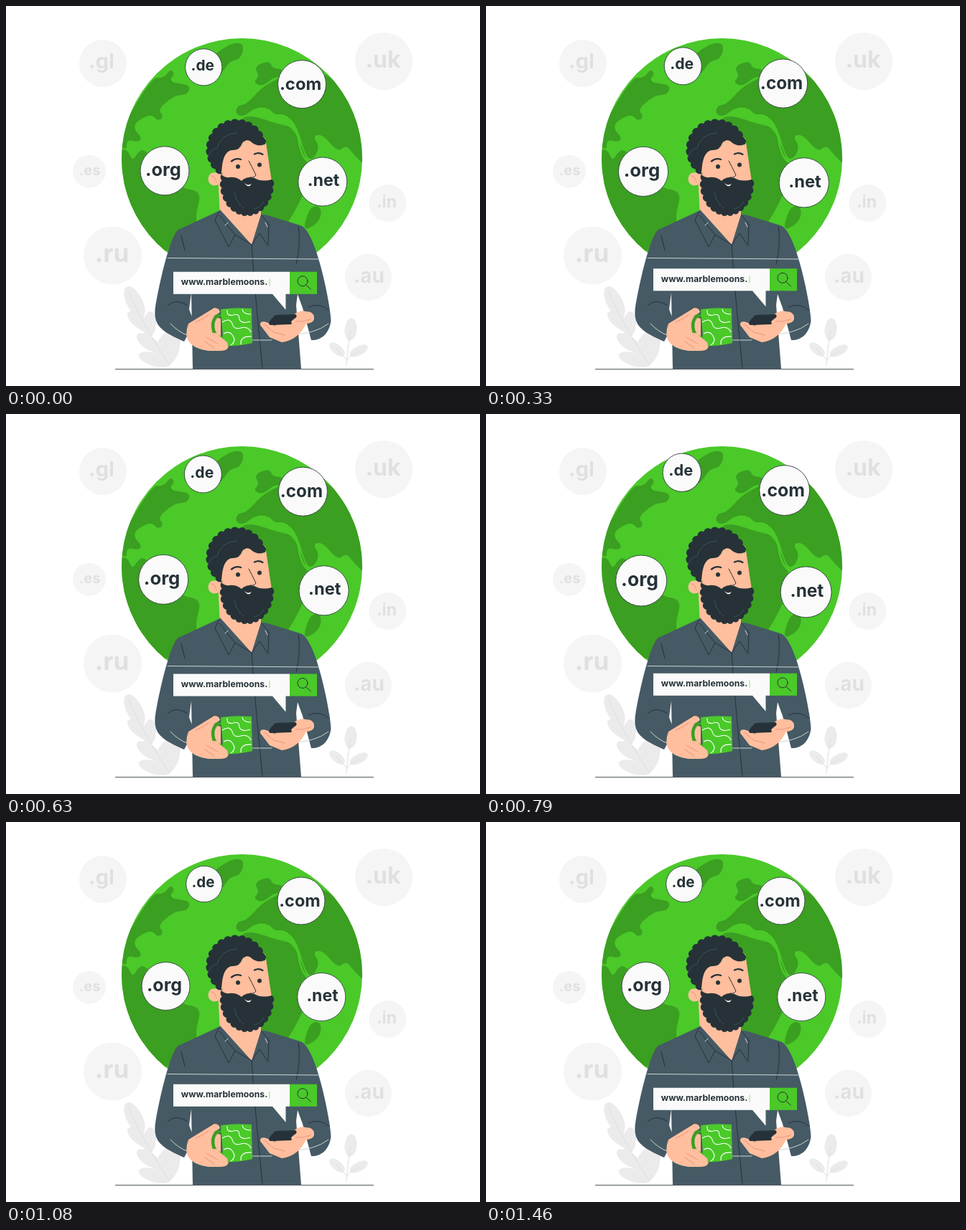
An HTML page for the animation above (1.5 s loop, 660 by 530 pixels).

```html
<!DOCTYPE html>
<html lang="en">
<head>
<meta charset="utf-8">
<title>Domain names</title>
<style>
  html, body { margin: 0; width: 100%; height: 100%; overflow: hidden; background: #fff; }
  svg { display: block; width: 100vw; height: 100vh; }
  text { font-family: Inter, "Open Sans", sans-serif; font-weight: 700; text-anchor: middle; }
  .line { fill: none; stroke: #263238; stroke-linecap: round; stroke-linejoin: round; }
  .brow { stroke-width: 2.3; }
  .pale { fill: none; stroke: #cfd4d2; stroke-linecap: round; }
  .crease { fill: none; stroke: #dd8f72; stroke-width: .8; stroke-linecap: round; }
  .skin { fill: #ffbe9d; }
  .dark { fill: #263238; }
  .shirt { fill: #455a64; }
  .land { fill: #3b9f21; }
  .green { fill: #4ac929; }
</style>
</head>
<body>
<svg viewBox="0 0 660 530">
  <defs><clipPath id="disc"><circle cx="328.5" cy="212.5" r="167.5"/></clipPath></defs>

  <g id="faded"></g>
  <g id="plants" fill="#ebebeb"></g>

  <circle class="green" cx="328.5" cy="212.5" r="167.5"/>
  <g id="lands" class="land" clip-path="url(#disc)"></g>
  <path d="M391 164Q404 168 407 184Q412 220 429 220" fill="none" stroke="#4ac929" stroke-width="2.5"/>

  <path d="M152 506.5H512" stroke="#263238" stroke-width=".8"/>

  <!-- body -->
  <path class="shirt" d="M296 286L240 312C228 319 210 402 207.5 425C206 447 219 455 248 468L262 442L255 423L258 400L260 506H411L404 417L406 402L413 421L425 466C440 467 451 455 452.5 438C453 425 433 313 410 306L361 291Z"/>
  <path class="skin" d="M295 236L298 293L342 333L355 304V276Z"/>
  <path class="shirt" d="M298 284L291 299L310 336L319 318L342 333Z"/>
  <path class="shirt" d="M355 291L366 304L365 334L353 318L342 333Z"/>
  <path class="line" d="M297 286L291 299L310 336L319 319L342 333L353 317L365 334L366 304L356 292M298 292Q305 303 319 319M342 333Q347 405 357 505"/>
  <path class="line" d="M407 308Q411 330 404 360M244 320L249 341M225 418Q235 407 252 417M449 424Q437 413 421 420"/>
  <path class="pale" d="M225 351.5L436 353M229 443Q239 454 254 460M396 458Q430 458 449 443M343 466H370M305 306L309 302M361 302L364 308"/>

  <!-- head -->
  <path class="skin" d="M299 184H361L370 245L360 270H304L298 248C276 260 276 222 299 235Z"/>
  <path id="hair" class="dark"/>
  <path id="beard" class="dark"/>
  <path class="line" d="M338 216Q342 223 348 236Q345 240 340 239"/>
  <path class="crease" d="M286 237Q292 238 293 246"/>
  <path class="line brow" d="M314 216.5Q320 211.5 327 214M346 206.5Q352 203.5 357.5 207"/>
  <circle class="dark" cx="323" cy="224" r="3"/>
  <circle class="dark" cx="353" cy="221.5" r="3"/>
  <path d="M331 245Q335 252 342 248Q337 256 331 245Z" fill="#fff"/>
  <path d="M281 211Q286 199 294 198Q299 178 322 177M318 260Q321 275 331 282M345 283Q355 281 359 272" fill="none" stroke="#455a64" stroke-width=".8"/>

  <!-- hand and cup -->
  <path class="skin" d="M254 443L290 421Q297 421 298 427L289 433L299 436V465L310 472Q311 480 300 481H282Q242 475 254 443Z"/>
  <path d="M301 432C282 427 285 470 304 461" fill="none" stroke="#3b9f21" stroke-width="4.5"/>
  <path class="green" d="M299 423Q320 420 342 422L343 470Q324 475 303 474Z"/>
  <path class="skin" d="M284 458Q291 453 296 459L308 469Q313 481 289 468Z"/>
  <path d="M308 424Q307 433 316 431Q325 428 325 437Q328 444 340 440M301 441Q311 434 315 443Q317 452 327 449Q337 446 341 455M303 457Q311 452 316 460T313 473M327 472Q326 460 342 461M329 423Q330 430 341 430" fill="none" stroke="#fff" stroke-width="1.1"/>
  <path class="crease" d="M264 441Q273 438 282 431M279 462L294 471M277 468L290 477"/>

  <!-- hand and phone -->
  <path class="skin" d="M400 431Q409 423 418 426Q428 426 429 434T418 443Q407 466 384 469L367 462L354 445Q353 435 374 446Z"/>
  <path class="dark" d="M375 431L403 430Q408 432 397 444L368 445Q362 443 375 431Z"/>
  <path class="skin" d="M397 440Q404 433 411 432T399 447Z"/>
  <path class="crease" d="M404 440Q413 441 424 437M360 444L373 455L388 459"/>

  <!-- search bar -->
  <g id="bar">
    <path d="M233 371H395V402H389.5V424L371 402H233Z" fill="#fafafa"/>
    <path class="green" d="M395 371H433V402H395Z"/>
    <path class="line" d="M418 389.5L424.5 395.5"/>
    <circle class="line" cx="413" cy="384" r="7"/>
    <text class="dark" x="304" y="389.5" font-size="12.2">www.marblemoons.</text>
    <path d="M367 381V391" stroke="#8fe07a"/>
  </g>

  <g id="beat"></g>
</svg>

<script>
const $ = id => document.getElementById(id);

// Land mass: closed curve through x,y pairs, rounded at the midpoints
function land(text) {
  const p = text.split(' ').map(s => s.split(',').map(Number));
  const mid = (a, b) => `${(a[0] + b[0]) / 2} ${(a[1] + b[1]) / 2}`;
  const d = 'M' + mid(p.at(-1), p[0]) +
    p.map((a, i) => `Q${a[0]} ${a[1]} ${mid(a, p[(i + 1) % p.length])}`).join('');
  $('lands').innerHTML += `<path d="${d}Z"/>`;
}

land('150,190 203,99 219,101 229,88 235,94 226,106 258,110 252,124 236,124 211,144 220,154 211,161 203,150 181,161 178,172 189,183 185,190 168,186 168,202');
land('150,200 169,199 176,217 184,203 194,199 240,254 273,258 264,290 267,308 240,320 225,350 150,310');
land('270,85 297,62 317,51 332,53 327,74 311,77 303,91 280,112 268,102');
land('346,86 357,79 368,78 371,87 386,88 388,101 374,98 357,113 344,106 353,98');
land('319,150 323,138 334,138 356,114 370,106 400,90 440,92 470,110 505,170 505,228 484,207 474,194 462,204 440,178 427,182 437,196 428,214 418,212 405,166 388,150 374,152 366,142 347,141 331,155');
land('322,162 338,151 380,165 401,169 422,222 424,240 405,282 382,318 340,310');
land('419,292 426,279 438,279 439,294 430,306 414,313');

// Chain of outward curls along an ellipse, angles in degrees
function curls(cx, cy, rx, ry, from, to, n) {
  let d = '', last;
  for (let i = 0; i <= n; i++) {
    const a = (from + (to - from) * i / n) * Math.PI / 180;
    const p = [cx + rx * Math.cos(a), cy + ry * Math.sin(a)];
    const r = last && Math.hypot(p[0] - last[0], p[1] - last[1]) * .58;
    d += last ? `A${r} ${r} 0 0 1 ${p}` : `${p}`;
    last = p;
  }
  return d;
}

$('hair').setAttribute('d', 'M' + curls(321, 200, 40, 40, 122, 350, 15) +
  'Q350 197 342 190Q336 184 329 191Q326 201 316 201Q304 201 301 222Z');
$('beard').setAttribute('d', 'M299 234Q304 240 311 239Q321 238 328 244Q335 237 346 240Q356 246 370 242L' +
  curls(335.5, 248, 35, 43, -8, 200, 15) + 'Z');

// Leaves: x, y, rx, ry, turn
const leaf = ([x, y, rx, ry, turn]) =>
  `<ellipse rx="${rx}" ry="${ry}" transform="translate(${x} ${y}) rotate(${turn})"/>`;
$('plants').innerHTML = [
  [179, 413, 11, 24, -27], [187, 441, 9, 22, -52], [200, 444, 9, 18, 5], [199, 470, 9, 20, -55],
  [225, 478, 16, 27, 20], [206, 493, 9, 22, -72],
  [480, 451, 8.5, 15.5, 5], [461, 479, 6.5, 13, -50], [491, 481, 6.5, 14, 62]
].map(leaf).join('') +
  '<path d="M170 397Q193 449 228 502M474 502Q475 480 480 452M460 478L475 494Q480 486 492 481" fill="none" stroke="#dedede"/>';

// label, circle x, y, r, text x, baseline, size
const badge = (attrs, ink) => ([label, cx, cy, r, x, y, size]) =>
  `<circle cx="${cx}" cy="${cy}" r="${r}" ${attrs}/><text x="${x}" y="${y}" font-size="${size}" fill="${ink}">${label}</text>`;

$('faded').innerHTML = [
  ['.gl', 135, 80, 33, 133, 87, 29],
  ['.uk', 526, 77, 40, 525, 86, 32],
  ['.es', 116, 230.5, 23, 116.5, 235.5, 20],
  ['.in', 531.5, 275, 26, 530, 281, 23],
  ['.ru', 148.5, 348, 40.5, 147.5, 357, 35],
  ['.au', 504.5, 378.5, 32.5, 505.5, 385.5, 28]
].map(badge('fill="#f5f5f5"', '#e0e0e0')).join('');

$('beat').innerHTML = [
  ['.de', 276, 86.5, 25.2, 274.5, 91, 20.5],
  ['.com', 411, 110, 33, 409, 118, 23.5],
  ['.org', 222.5, 229, 33.5, 220.5, 236, 25],
  ['.net', 439.3, 244, 33.5, 440.5, 250, 23]
].map(badge('fill="#fafafa" stroke="#263238" stroke-width=".8"', '#263238')).join('');

const LOOP = 1500, STEP = LOOP / 36;
const beat = [[0, 1], [.1, 1.1], [.3, 1], [.4, 1], [.5, 1.1], [.6, 1], [1, 1]];
const float = [[0, 0], [.5, -10], [1, 0]];

function at(keys, u) {
  const i = keys.findIndex(k => k[0] > u);
  const [a, b] = [keys[i - 1], keys[i]];
  return a[1] + (b[1] - a[1]) * (u - a[0]) / (b[0] - a[0]);
}

// 24 poses a second, held on a 10 ms clock
function draw(ms) {
  const tick = Math.floor(ms % LOOP / 10) * 10;
  const u = (Math.floor((tick + 4.9) / STEP) + .5) * STEP / LOOP;
  $('beat').setAttribute('transform', `translate(331 169.6) scale(${at(beat, u)}) translate(-331 -169.6)`);
  $('bar').setAttribute('transform', `translate(0 ${at(float, u)})`);
}

let start;
function loop(now) {
  start ??= now;
  draw(Math.max(0, now - start));
  requestAnimationFrame(loop);
}
draw(0);
requestAnimationFrame(loop);
</script>
</body>
</html>
```
